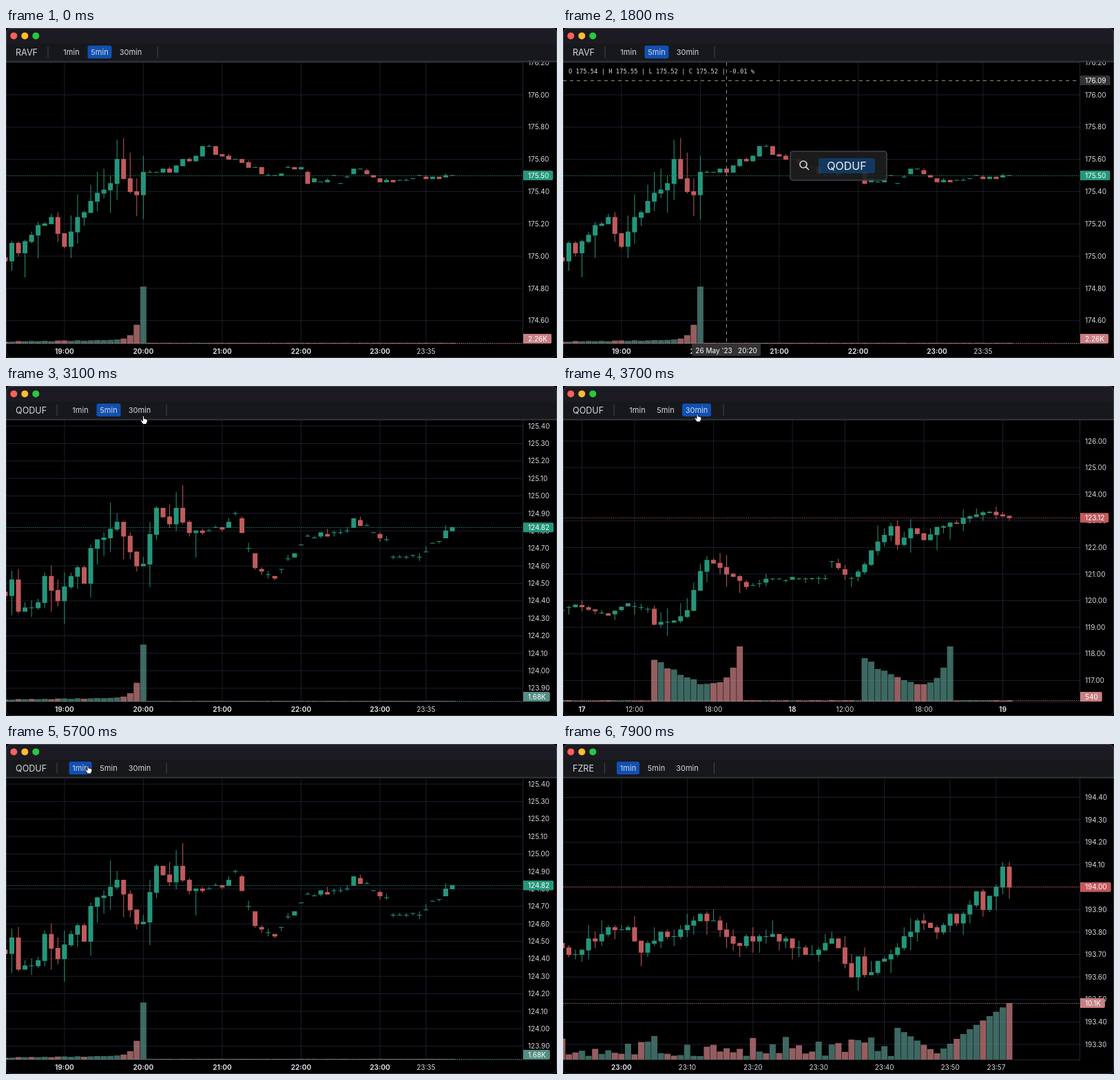
An HTML page with a canvas for the animation above (8000 ms loop, 800x479 px).

```html
<!DOCTYPE html>
<html lang="en">
<head>
<meta charset="utf-8">
<title>Chart</title>
<style>
html, body { margin: 0; width: 100%; height: 100%; overflow: hidden; background: #000; }
canvas { display: block; width: 800px; height: 479px; }
</style>
</head>
<body>
<canvas id="stage" width="800" height="479"></canvas>
<script>
const ctx = document.getElementById('stage').getContext('2d');
const UP = 'rgb(36,150,123)', DOWN = 'rgb(193,90,93)';
const VOL_UP = '83,141,131', VOL_DOWN = '200,127,130';
const TEXT = '#d6d8de', SANS = 'Inter, sans-serif', MONO = '"DejaVu Sans Mono", monospace';
const AXIS_X = 750, AXIS_Y = 458, TOP = 50, PITCH = 9.545, COUNT = 69;

const rnd = (i, salt) => {
  const n = Math.sin(i * 12.9898 + salt * 78.233) * 43758.5453;
  return n - Math.floor(n);
};

// Linear path through index, value pairs
function along(keys, i) {
  let k = 0;
  while (k + 4 < keys.length && keys[k + 2] < i) k += 2;
  const [x1, y1, x2, y2] = keys.slice(k, k + 4);
  return y1 + (y2 - y1) * (i - x1) / (x2 - x1);
}

const hours = [...Array.from({ length: 5 }, (_, k) => [9 + 12 * k, `${19 + k}:00`, true]), [64, '23:35']];
const minutes = [...Array.from({ length: 6 }, (_, k) => [9 + 10 * k, `23:${k}0`, k === 0]), [66, '23:57']];

// Volume swells towards the closing bell at bar 21
const closingBell = i => i > 21 ? 1 : 2.5 + i * .12 + rnd(i, 7) + 77 * Math.exp((i - 21) * 1.25);

// Half-hour bars: a day has 32, of which 14 belong to the main session
const sessionBar = i => (i + 18) % 32;
const inSession = i => sessionBar(i) < 14;
function dailyVolume(i) {
  if (!inSession(i)) return 1 + rnd(i, 8);
  const k = sessionBar(i) / 13;
  return 20 + 38 * (1 - k) ** 3 + 60 * k ** 9 + 12 * rnd(i, 8) * (1 - k);
}

// Prices are in cents above base; zero and unit map them to the stage
const first5 = {
  base: 175, zero: 331.1, unit: 2.341, from: -40, to: 120, step: 20, times: hours, volLabel: '2.26K',
  keys: [0,-3, 1,8, 2,2, 5,19, 7,24, 9,6, 11,24, 14,39, 16,45, 17,60, 19,40, 20,38, 21,52, 24,54, 25,52, 27,60,
    28,59, 30,68, 34,60, 40,50, 45,55, 46,45, 50,50, 51,45, 53,54, 57,46, 67,50, 68,50],
  jitter: 4, calm: i => i > 39, wick: i => i < 22 ? 16 : 0, volume: closingBell
};
const second5 = {
  base: 124, zero: 413.3, unit: 2.537, from: -10, to: 140, step: 10, times: hours, volLabel: '1.68K',
  keys: [0,43, 1,52, 2,34, 5,39, 6,54, 8,40, 11,59, 12,50, 13,70, 17,85, 20,60, 21,61, 23,93, 25,84, 26,93,
    28,79, 33,81, 35,90, 38,59, 41,53, 46,77, 52,80, 53,87, 58,75, 59,65, 63,65, 68,82],
  jitter: 3, calm: i => i > 29 && i < 68, wick: i => i < 30 ? 14 : 2, volume: closingBell
};
const second30 = {
  base: 119, zero: 350.2, unit: .386, from: -200, to: 700, step: 100, volLabel: '540',
  times: [[3, '17', true], [11, '12:00'], [23, '18:00'], [35, '18', true], [43, '12:00'], [55, '18:00'], [67, '19', true]],
  keys: [0,63, 2,84, 7,45, 10,89, 13,68, 14,11, 17,24, 19,63, 21,210, 22,252, 23,241, 28,153, 32,182, 40,183,
    41,247, 44,184, 46,236, 47,288, 50,379, 51,311, 53,371, 55,329, 57,376, 65,433, 67,418, 68,412],
  jitter: 14, calm: i => !inSession(i) && i < 60, wick: i => inSession(i) ? 60 : 30, volume: dailyVolume
};
const third1 = {
  base: 193, zero: 533.8, unit: 3.26, from: 30, to: 140, step: 10, times: minutes, volLabel: '10.1K',
  keys: [0,73, 1,70, 2,70, 7,82, 10,82, 12,71, 15,80, 17,78, 21,88, 23,85, 26,75, 32,79, 38,70, 41,77, 44,60,
    45,69, 46,61, 50,70, 54,85, 57,80, 59,88, 60,84, 63,98, 64,90, 66,100, 67,109, 68,100],
  jitter: 4, calm: () => false, wick: () => 6,
  volume: i => along([0,5, 50,5, 51,46, 57,9, 62,44, 68,82], i) + (i < 51 ? 30 * rnd(i, 9) ** 2 : 0)
};
// Rarely traded: each step is start, close and, for a full body, open
const second1 = {
  base: 124, zero: 1053.3, unit: 10.75, from: 60, to: 90, step: 5, times: minutes, volLabel: '200',
  steps: [[0, 80], [4, 71, 79], [5, 80], [10, 78], [11, 79], [16, 75], [21, 73, 75], [22, 70], [23, 65], [39, 75],
    [40, 66, 69], [43, 71, 65], [44, 71, 72], [54, 80, 79], [55, 74, 75], [62, 79], [65, 78], [66, 80, 79], [68, 82]]
};

function pathBars({ base, keys, jitter, calm, wick, volume }) {
  let prev = keys[1] + 2;
  return Array.from({ length: COUNT }, (_, i) => {
    const isKey = keys.some((k, n) => n % 2 === 0 && k === i);
    const c = Math.round(along(keys, i) + (isKey ? 0 : jitter * (rnd(i, base) - .5)));
    const o = calm(i) ? Math.round(c + (prev - c) * (rnd(i, base + 1) < .5 ? 0 : .7)) : prev;
    const h = Math.max(o, c) + Math.round(wick(i) * rnd(i, base + 2) ** 2) + (i % 3 === 1 ? 1 : 0);
    const l = Math.min(o, c) - Math.round(wick(i) * rnd(i, base + 3) ** 2);
    prev = c;
    return { o, c, h, l, v: volume(i) };
  });
}

function stepBars({ steps }) {
  return Array.from({ length: COUNT }, (_, i) => {
    const [start, c, open = c] = steps.filter(s => s[0] <= i).pop();
    const moved = i > 0 && start === i, o = moved ? open : c;
    const l = Math.min(o, c) - Math.max(0, Math.floor((o - c) / 3));
    return { o, c, h: Math.max(o, c), l, v: moved ? 11 + 9 * Math.abs(o - c) : 1 };
  });
}

for (const chart of [first5, second5, second30, second1, third1])
  chart.bars = chart.steps ? stepBars(chart) : pathBars(chart);

const symbols = [
  { name: 'RAVF', from: 0, shift: 0 },
  { name: 'QODUF', from: 2100, shift: 13 },
  { name: 'FZRE', from: 7600, shift: -.5 }
];
const charts = [[0, first5], [2600, second5], [3600, second30], [4600, second5], [5900, second1], [7700, third1]];
const intervals = [[0, 1], [3400, 2], [4300, 1], [5500, 0]];
const searches = [{ from: 1400, to: 2100, text: symbols[1].name }, { from: 7100, to: 7600, text: symbols[2].name }];
const buttons = [['1min', 95, 33], ['5min', 136, 35], ['30min', 181, 42]];
const moves = [
  [100, 700, 214, 21, 242, 76], [2700, 3200, 242, 76, 195, 40],
  [3900, 4200, 195, 40, 151, 35], [4800, 5400, 151, 35, 119, 31]
];

const latest = (list, t) => list.filter(e => e[0] <= t).pop()[1];
const barX = i => 8.5 + PITCH * (i - 1);
const rect = (x, y, w, h, color) => { ctx.fillStyle = color; ctx.fillRect(x, y, w, h); };

function text(str, x, y, size, color = TEXT, align = 'left', weight = 400, family = SANS) {
  ctx.font = `${weight} ${size}px ${family}`;
  ctx.textAlign = align;
  ctx.textBaseline = 'alphabetic';
  ctx.fillStyle = color;
  ctx.fillText(str, x, y + size * .36);
}

function box(x, y, w, h, r, fill, stroke) {
  ctx.beginPath();
  ctx.roundRect(x, y, w, h, r);
  if (fill) { ctx.fillStyle = fill; ctx.fill(); }
  if (stroke) { ctx.strokeStyle = stroke; ctx.stroke(); }
}

function dashed(x1, y1, x2, y2, color, dash) {
  ctx.strokeStyle = color;
  ctx.lineWidth = 1;
  ctx.setLineDash(dash);
  ctx.beginPath();
  ctx.moveTo(x1, y1);
  ctx.lineTo(x2, y2);
  ctx.stroke();
  ctx.setLineDash([]);
}

function tag(str, y, color) {
  ctx.font = `400 10px ${SANS}`;
  box(751, y - 7, ctx.measureText(str).width + 13, 14, [0, 2, 2, 0], color);
  text(str, 758, y, 10, '#fff');
}

function drawChart(chart) {
  const y = v => chart.zero - v * chart.unit;
  for (const [i] of chart.times) rect(barX(i) - .5, TOP, 1, AXIS_Y - TOP, 'rgb(29,30,38)');
  for (let v = chart.from; v <= chart.to; v += chart.step) {
    rect(0, y(v) - .5, AXIS_X, 1, 'rgb(29,30,52)');
    text((chart.base + v / 100).toFixed(2), 758, y(v), 10);
  }
  chart.bars.forEach((b, i) => {
    rect(barX(i) - 4.5, AXIS_Y - b.v, 9, b.v, `rgba(${b.c > b.o ? VOL_UP : VOL_DOWN},.74)`);
  });
  chart.bars.forEach((b, i) => {
    const x = barX(i), color = b.c >= b.o ? UP : DOWN;
    const top = y(Math.max(b.o, b.c)) - .5;
    rect(x - .5, y(b.h) - .5, 1, (b.h - b.l) * chart.unit + 1, color);
    rect(x - 3.5, top, 7, Math.abs(b.o - b.c) * chart.unit + 1, color);
  });
  const last = chart.bars[COUNT - 1], price = y(last.c), volY = AXIS_Y - last.v;
  const color = last.c >= last.o ? UP : DOWN;
  const volColor = `rgb(${last.c > last.o ? VOL_UP : VOL_DOWN})`;
  dashed(0, Math.floor(price) + .5, AXIS_X, Math.floor(price) + .5, color, [1.2, 1.6]);
  dashed(0, Math.floor(volY) + .5, AXIS_X, Math.floor(volY) + .5, volColor, [1.2, 1.6]);
  rect(AXIS_X, TOP, 1, AXIS_Y - TOP + 1, '#24252f');
  rect(0, AXIS_Y, AXIS_X, 1, '#24252f');
  tag((chart.base + last.c / 100).toFixed(2), price, color);
  tag(chart.volLabel, Math.min(451, volY), volColor);
  for (const [i, label, bold] of chart.times) text(label, barX(i), 469, 10, TEXT, 'center', bold ? 700 : 400);
}

function drawCrosshair(chart, px, py) {
  const i = Math.round((px - barX(0)) / PITCH), x = barX(i), b = chart.bars[i];
  const price = v => (chart.base + v / 100).toFixed(2);
  dashed(Math.floor(x) + .5, TOP, Math.floor(x) + .5, AXIS_Y, '#8e8e8e', [5, 5]);
  dashed(0, Math.floor(py) + .5, AXIS_X, Math.floor(py) + .5, '#8e8e8e', [5, 5]);
  tag(price((chart.zero - py) / chart.unit), py, '#333335');
  const m = (i - 9) * 5, pad = n => String(n).padStart(2, '0');
  box(x - 50.5, 458, 100, 18, 2, '#333335');
  text(`26 May '23\u00a0\u00a0\u00a0${19 + Math.floor(m / 60)}:${pad(m % 60)}`, x - .5, 468, 10, '#fff', 'center');
  const change = ((b.c - b.o) / (chart.base + b.o / 100)).toFixed(2);
  text(`O ${price(b.o)} | H ${price(b.h)} | L ${price(b.l)} | C ${price(b.c)} | ${change} %`, 8, 63, 8.8, TEXT, 'left', 400, MONO);
}

function drawBars(t) {
  const { name, shift } = symbols.filter(s => s.from <= t).pop();
  const active = latest(intervals, t);
  rect(0, 0, 800, 23, '#1c1a22');
  ['#ff5f57', '#febc2e', '#28c840'].forEach((color, i) => box(6.3 + 16 * i, 6.4, 10, 10, 5, color));
  rect(0, 23, 800, 24.5, '#17181b');
  rect(0, 47.5, 800, 2.3, '#30343a');
  text(name, 14, 35, 12.6);
  rect(60.5 + shift, 27, 1, 16, '#41464d');
  rect(219.5 + shift, 27, 1, 16, '#41464d');
  buttons.forEach(([label, x, w], i) => {
    if (i === active) box(x + shift - w / 2, 25.6, w, 18.6, 3, '#1150b2');
    text(label, x + shift, 35, 11, TEXT, 'center');
  });
}

function drawSearch(str) {
  ctx.lineWidth = 1.6;
  box(330, 179, 140, 42, 4, 'rgba(30,30,30,.9)', '#3c434c');
  ctx.strokeStyle = TEXT;
  ctx.beginPath();
  ctx.arc(349, 198, 5, 0, 7);
  ctx.moveTo(352.6, 201.6);
  ctx.lineTo(357, 206);
  ctx.stroke();
  box(371, 189, 82, 22, 4, 'rgba(0,122,255,.3)');
  text(str, 412, 200, 16, '#f0f0f0', 'center');
}

function drawPointer(x, y, hand) {
  const path = new Path2D(hand
    ? 'M-1 1Q0-1 1 1V4.2Q2 3.2 2.9 4.6Q4 3.8 4.6 5.2Q6 4.8 6 6.5Q6 9 4.6 10.2V12H-1.4V10.6Q-3 9-4 6.8Q-4.4 5.3-2.8 5.8L-1 7.4Z'
    : 'M0 0V11.2L2.6 8.8L4.4 13L6.4 12.1L4.6 8.1H8.1Z');
  ctx.save();
  ctx.translate(x, y);
  ctx.lineJoin = 'round';
  ctx.lineWidth = hand ? .9 : 1.1;
  ctx.fillStyle = hand ? '#fff' : '#000';
  ctx.strokeStyle = hand ? '#000' : '#fff';
  ctx.fill(path);
  ctx.stroke(path);
  ctx.restore();
}

function pointerAt(t) {
  const move = moves.filter(m => m[0] <= t).pop();
  if (!move) return null;
  const [from, to, x1, y1, x2, y2] = move;
  const k = Math.min(1, (t - from) / (to - from)), e = (1 - Math.cos(Math.PI * k)) / 2;
  return { x: x1 + (x2 - x1) * e, y: y1 + (y2 - y1) * e };
}

function frame(now) {
  const t = Math.floor(now % 8000 / 100) * 100;
  const chart = latest(charts, t), pointer = pointerAt(t);
  const typing = searches.find(s => t >= s.from && t < s.to);
  const hidden = (t >= 1400 && t < 2700) || t >= 7100;
  ctx.clearRect(0, 0, 800, 479);
  ctx.save();
  ctx.beginPath();
  ctx.roundRect(0, 0, 800, 479, 7);
  ctx.clip();
  rect(0, 0, 800, 479, '#000');
  drawChart(chart);
  if (pointer && pointer.y > TOP) drawCrosshair(chart, pointer.x, pointer.y);
  drawBars(t);
  if (typing) drawSearch(typing.text.slice(0, 1 + (t - typing.from) / 100));
  if (pointer && !hidden) drawPointer(pointer.x, pointer.y, pointer.y > 26 && pointer.y < 44 && pointer.x < 212);
  ctx.restore();
  ctx.lineWidth = 1;
  box(.5, .5, 799, 478, 7, null, 'rgba(255,255,255,.2)');
  requestAnimationFrame(frame);
}
requestAnimationFrame(frame);
</script>
</body>
</html>
```
